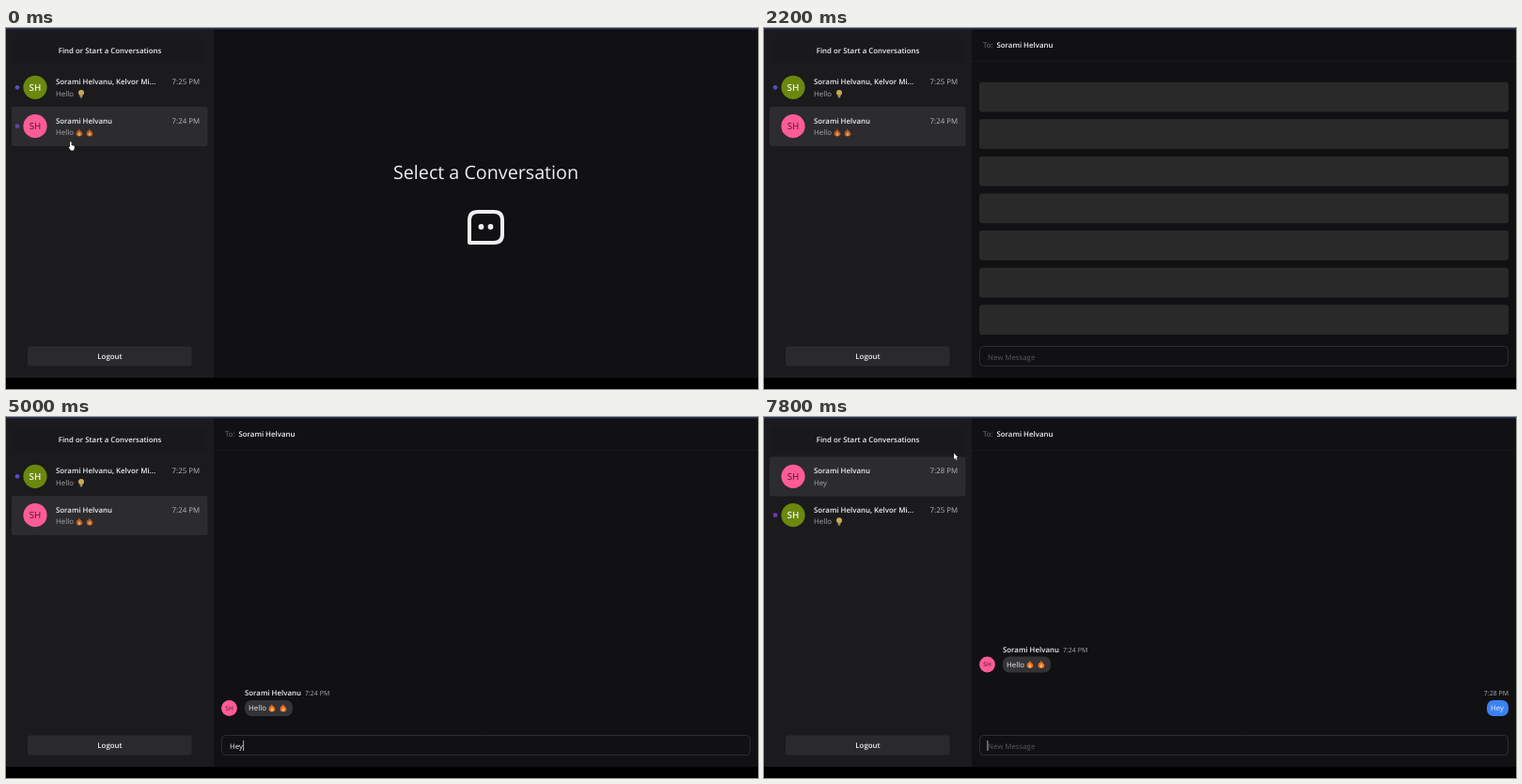
Recreate the animation shown at these times as an HTML page with a canvas. Size 800x385 px, loop 8000 ms.

```html
<!DOCTYPE html>
<html lang="en">
<head>
<meta charset="utf-8">
<title>Chat</title>
<style>
  html, body { margin: 0; width: 100%; height: 100%; overflow: hidden; background: #000; }
  canvas { display: block; width: 800px; height: 385px; }
</style>
</head>
<body>
<canvas id="stage" width="800" height="385"></canvas>
<script>
const ctx = document.getElementById('stage').getContext('2d');
ctx.textRendering = 'geometricPrecision';

const LOOP = 8000;
const FAMILY = '"Open Sans", "Noto Sans", sans-serif';
const CONTACT = 'Sorami Helvanu';
const GROUP = CONTACT + ', Kelvor Mi...';
const PINK = '#ff5c96', OLIVE = '#6b880e', WHITE = '#f0eff1', GREY = '#a9a8ab';

// Times in ms at which the state changes
const READ = 500, OPEN = 1400, LOADED = 2600, FOCUS = 2900,
      SENT = 5400, CLEARED = 6240, REORDERED = 6400;
const KEYS = [3900, 4250, 4500];

function text(str, x, y, { size = 7.85, color = WHITE, weight = 400, align = 'left' } = {}) {
  ctx.font = `${weight} ${size}px ${FAMILY}`;
  ctx.textAlign = align;
  ctx.fillStyle = color;
  ctx.fillText(str, x, y);
}

function box(x, y, w, h, color, radius = 0) {
  ctx.beginPath();
  ctx.roundRect(x, y, w, h, radius);
  ctx.fillStyle = color;
  ctx.fill();
}

function dot(x, y, r, color) {
  ctx.beginPath();
  ctx.arc(x, y, r, 0, Math.PI * 2);
  ctx.fillStyle = color;
  ctx.fill();
}

function shape(d, x, y, fill, stroke, width = 1) {
  const path = new Path2D(d);
  ctx.save();
  ctx.translate(x, y);
  ctx.lineJoin = 'round';
  if (stroke) {
    ctx.strokeStyle = stroke;
    ctx.lineWidth = width;
    ctx.stroke(path);
  }
  if (fill) {
    ctx.fillStyle = fill;
    ctx.fill(path);
  }
  ctx.restore();
}

function flame(x, y, alpha = 1) {
  ctx.globalAlpha = alpha;
  shape('M-.5-4.5C0-2 3.6-1 3.4 1.4C3.2 5-3.2 5-3.4 1.4C-3.5 0-2.8-1-2-2C-1.3-1.4-.4-2.6-.5-4.5Z', x, y, '#ee6a25');
  shape('M0-1C.4.4 1.7.8 1.5 2.3C1.2 4.2-1.3 4.2-1.5 2.3C-1.6 1.2-.4.6 0-1Z', x, y, '#ffbe4a');
  ctx.globalAlpha = 1;
}

function bulb(x, y) {
  dot(x, y - 1.2, 3, '#c9a951');
  box(x - 1.4, y + 1, 2.8, 2, '#b29a58');
  box(x - 1.2, y + 2.7, 2.4, 1.6, '#88857e', .5);
}

function avatar(x, y, r, color) {
  dot(x, y, r, color);
  const size = r * .78;
  text('SH', x, y + size * .36, {
    size, align: 'center', weight: color === PINK ? 400 : 600,
    color: color === PINK ? '#421a2b' : WHITE
  });
}

function row(y, { name, message, time, color, active, unread, icons }) {
  if (active) box(6, y, 208.5, 42, '#2c2b2d', 2);
  if (unread) dot(12, y + 20.7, 2.4, unread);
  avatar(31, y + 20.7, 12.6, color);
  text(name, 53, y + 17.7, { weight: 600 });
  text(time, 206, y + 17.7, { align: 'right', color: '#b9b8bb' });
  text(message, 53, y + 30.2, { color: GREY });
  if (icons) icons(y + 27.5);
}

function sidebar(t, hovering) {
  box(0, 0, 221, 373, '#1b1a1c');
  box(8, 12, 204, 25, '#19181a', 3);
  text('Find or Start a Conversations', 110.5, 27, { weight: 600, align: 'center' });

  const moved = t >= REORDERED;
  row(moved ? 84 : 42.6, {
    name: GROUP, message: 'Hello', time: '7:25 PM', color: OLIVE,
    unread: moved ? '#7138b5' : '#5550b8', icons: y => bulb(80, y)
  });
  row(moved ? 42.6 : 84, {
    name: CONTACT, message: moved ? 'Hey' : 'Hello', time: moved ? '7:28 PM' : '7:24 PM',
    color: PINK, active: hovering || t >= OPEN, unread: t < READ && '#5d4699',
    icons: moved ? null : y => { flame(78, y, .72); flame(89, y, .72); }
  });

  box(23, 339.5, 174.5, 21, '#2a292b', 2);
  text('Logout', 110.5, 353.2, { weight: 600, align: 'center' });
}

function welcome() {
  text('Select a Conversation', 510.5, 161, { size: 19.7, align: 'center' });
  shape('M2 35V11Q2 2 11 2H28Q37 2 37 11V26Q37 35 28 35Z', 491, 194, null, WHITE, 4);
  dot(505.5, 212, 2.9, WHITE);
  dot(515.5, 212, 2.9, WHITE);
}

function messages(t) {
  const y = t >= SENT ? -46.5 : 0;
  avatar(237.5, 310.5 + y, 8.4, PINK);
  text(CONTACT, 254, 297 + y, { weight: 600 });
  text('7:24 PM', 318, 297 + y, { size: 7, color: GREY });
  box(254, 302 + y, 51, 17, '#343336', 7);
  text('Hello', 258, 313.3 + y);
  flame(283, 310.3 + y);
  flame(295, 310.3 + y);
  if (t >= SENT) {
    text('7:28 PM', 792, 297, { size: 7, color: GREY, align: 'right' });
    box(769, 302, 23, 17, '#3b82f6', 7);
    text('Hey', 773, 313.3);
  }
}

function input(t) {
  ctx.beginPath();
  ctx.roundRect(229.5, 339.5, 562, 21, 4);
  ctx.strokeStyle = '#2d2c2f';
  ctx.lineWidth = 1;
  ctx.stroke();

  const typed = t < CLEARED ? 'Hey'.slice(0, KEYS.filter(k => t >= k).length) : '';
  text(typed || 'New Message', 238, 353.5, { color: typed ? WHITE : '#59585c' });

  const lastEdit = [FOCUS, ...KEYS, CLEARED].filter(k => t >= k).pop();
  if (lastEdit && (t - lastEdit) % 1060 < 530) {
    const x = typed ? 238.3 + ctx.measureText(typed).width : 237.5;
    box(x, 345, .8, 11, '#d5d4d7');
  }
}

function conversation(t) {
  text('To:', 233, 21, { color: '#777679' });
  text(CONTACT, 247.5, 21, { weight: 600 });
  box(221, 35, 579, 1, '#19181b');
  if (t >= LOADED) messages(t);
  else for (let i = 0; i < 7; i++) box(229, 57.7 + i * 39.6, 563, 31.7, '#2a292a', 3);
  input(t);
}

const ease = p => { p = Math.min(1, Math.max(0, p)); return p * p * (3 - 2 * p); };
const glide = (a, b, p) => [a[0] + (b[0] - a[0]) * p, a[1] + (b[1] - a[1]) * p];

function pointer(t) {
  if (t < OPEN) return glide([67, 121], [366.5, 324.5], ease((t - 300) / 850));
  if (t < 3800) return glide([366.5, 324.5], [353, 350], ease((t - OPEN) / 500));
  return glide([353, 350], [202, 38.5], ease((t - 6900) / 800));
}

function cursor([x, y], hand) {
  if (y > 339) return;
  if (hand) shape('M1 .5Q2 -.3 2.6 .8V4L5.4 4.8Q6.2 5.2 5.8 6.8L5 9.5H2L-.2 6.6Q0 5.2 1 6Z', x, y, '#fff', '#222', .7);
  else shape('M0 0V6.5L1.5 5.2L2.5 7.4L3.5 6.9L2.5 4.8H4.4Z', x, y, '#fff', '#111', .7);
}

function draw(t) {
  box(0, 0, 800, 385, '#000');
  box(0, 0, 800, 373, '#111012');
  const at = pointer(t);
  const hovering = t < OPEN && at[0] < 214 && at[1] < 128;
  sidebar(t, hovering);
  if (t < OPEN) welcome();
  else conversation(t);
  box(0, 0, 800, 1.4, '#2b3154');
  cursor(at, hovering);
}

const start = performance.now();
function tick() {
  draw((performance.now() - start) % LOOP);
  requestAnimationFrame(tick);
}
tick();
</script>
</body>
</html>
```
